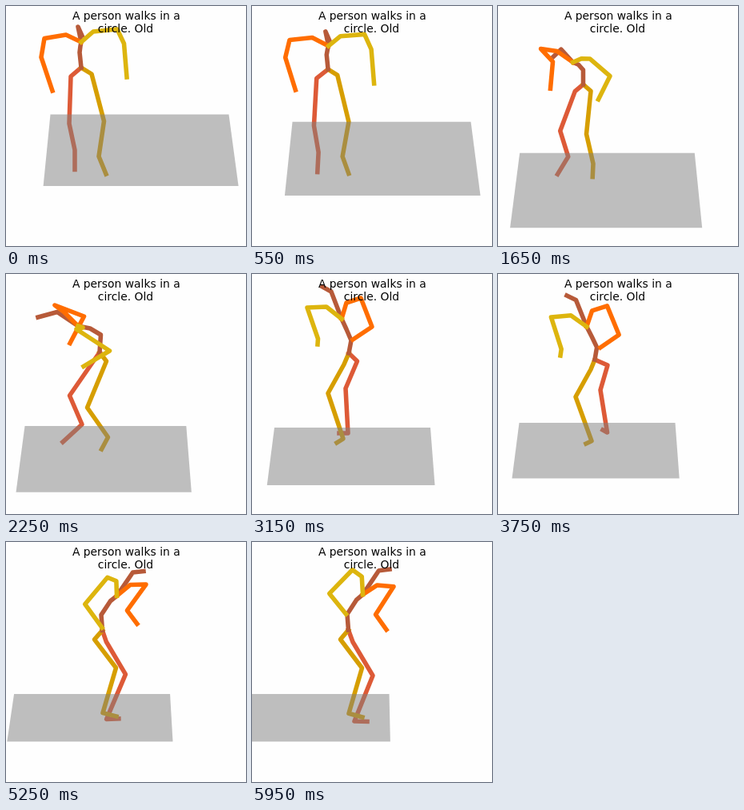
Animation, 300 px wide and 300 px high, one loop 6 s. Source, as an HTML page:

```html
<!DOCTYPE html>
<html lang="en">
<head>
<meta charset="utf-8">
<title>Walking figure</title>
<style>
  html, body { margin: 0; width: 100%; height: 100%; overflow: hidden; background: #fefefe; }
  svg { display: block; width: 100vw; height: 100vh; }
  polyline { fill: none; stroke-width: 5.56; stroke-linecap: square; stroke-linejoin: round; }
  text { font: 13.89px "DejaVu Sans", sans-serif; text-anchor: middle; }
</style>
</head>
<body>
<svg viewBox="0 0 300 300">
  <polyline id="rightLeg" stroke="#dd5a37"/>
  <polyline id="leftLeg" stroke="#d69e00"/>
  <polyline id="spine" stroke="#b75a39"/>
  <polyline id="rightArm" stroke="#ff6d00"/>
  <polyline id="leftArm" stroke="#ddb50e"/>
  <polygon id="floor" fill="#808080" fill-opacity=".5"/>
  <text x="150.3" y="17.3">A person walks in a</text>
  <text x="149.5" y="33.2">circle. Old</text>
</svg>
<script>
const LOOP = 6000, STEP = 50, STILL = [0, 0];

// Four key poses as x, y pairs. The spine runs from pelvis to head; limbs leave out their root.
// While a pose lasts, the pelvis and the tip of each chain drift by the given amounts.
const poses = [
  {
    name: "front", from: 0, to: 1050,
    spine: [94, 77, 92, 58, 93, 50, 94, 45, 90, 26, 95, 37],
    rightArm: [75, 36, 48, 40.5, 44, 64, 58, 106],
    leftArm: [109, 32, 139, 29, 147.5, 47, 151, 89],
    rightLeg: [81, 88, 79, 147, 86, 180, 86, 204.5],
    leftLeg: [107, 85, 122.5, 144, 116, 188, 125, 210],
    drift: { pelvis: [2, 4], spine: [4, 13], rightArm: [-7, -2], leftArm: [3, 15], rightLeg: [-8, 6], leftLeg: [-8, -1] }
  },
  {
    name: "turning", from: 2250, to: 2250,
    spine: [117, 98, 118.5, 76, 105, 68, 90, 65, 64, 47.5, 40, 54],
    rightArm: [72, 47, 61, 39, 97.5, 53, 80, 86.5],
    leftArm: [96, 67, 88, 69, 129.5, 96, 97, 115.5],
    rightLeg: [112, 105, 79.5, 152, 95, 188, 71, 210],
    leftLeg: [125.5, 109, 101.5, 167, 127.5, 204, 119.5, 219],
    drift: {}
  },
  {
    name: "facing left", from: 3150, to: 3750,
    spine: [121, 99, 124, 83, 118, 69, 112, 56, 99, 22, 88, 16],
    rightArm: [118, 36, 136, 30, 150, 66, 126, 82],
    leftArm: [93, 41, 69, 42, 82.5, 81, 82, 88],
    rightLeg: [131.5, 109, 117, 143, 120, 199, 109, 199],
    leftLeg: [115, 113, 95, 149, 114, 206, 106, 211],
    drift: { pelvis: [0, 8], spine: [-2, 11], rightArm: [2, 10], leftArm: [-4, 14], rightLeg: [22, -4], leftLeg: [4, 1] }
  },
  {
    name: "facing right", from: 4600, to: 5950,
    spine: [120.5, 111, 119, 92, 130.5, 75, 138.5, 69, 158.5, 40, 172, 39],
    rightArm: [154.5, 53, 173, 50.5, 148.5, 81, 160, 95.5],
    leftArm: [138.5, 54, 128, 53, 100.5, 90, 122.5, 123],
    rightLeg: [124.5, 124, 148, 164, 123.5, 219, 138, 217.5],
    leftLeg: [110.5, 122, 137.5, 157, 121, 213, 138, 217],
    drift: { pelvis: [0, -1], spine: [0, -5], rightArm: [8, 14], leftArm: [-5, -33], rightLeg: [6, 7], leftLeg: [0, 2] }
  }
];

const mix = (a, b, u) => a + (b - a) * u;
const ramp = (t, a, b) => Math.min(1, Math.max(0, (t - a) / Math.max(1, b - a)));
const ease = (t, a, b) => { const u = ramp(t, a, b); return u * u * (3 - 2 * u); };

// A start value plus eased moves, each [amount, begin, end].
const track = (t, start, ...moves) =>
  moves.reduce((sum, [amount, a, b]) => sum + amount * ease(t, a, b), start);

// Shift a chain of points, blending from the root's shift to the tip's.
function slide(points, root, tip, u) {
  const last = points.length / 2 - 1;
  return points.map((v, i) => v + u * mix(root[i % 2], tip[i % 2], Math.floor(i / 2) / last));
}

function shape(pose, u) {
  const { pelvis = STILL, spine: head = STILL } = pose.drift;
  const chestShift = pelvis.map((p, i) => mix(p, head[i], 3 / 5));
  const limb = (name, root, shift) =>
    slide([...root, ...pose[name]], shift, pose.drift[name] || STILL, u);
  const hip = pose.spine.slice(0, 2), chest = pose.spine.slice(6, 8);
  return {
    spine: slide(pose.spine, pelvis, head, u),
    rightArm: limb("rightArm", chest, chestShift),
    leftArm: limb("leftArm", chest, chestShift),
    rightLeg: limb("rightLeg", hip, pelvis),
    leftLeg: limb("leftLeg", hip, pelvis)
  };
}

const setPoints = (id, points) =>
  document.getElementById(id).setAttribute("points", points.map(v => v.toFixed(2)).join(" "));

function drawBody(t) {
  const i = poses.findLastIndex(p => p.from <= t);
  const pose = poses[i], next = poses[i + 1] || pose;
  const now = shape(pose, ramp(t, pose.from, pose.to)), then = shape(next, 0);
  const u = next === pose ? 0 : ease(t, pose.to, next.from);
  // The figure crouches while it turns; the feet stay put.
  const dip = track(t, 0, [12, 1050, 1650], [-12, 1650, 2250]);

  for (const name in now) {
    setPoints(name, now[name].map((a, k) => {
      const v = mix(a, then[name][k], u);
      return k % 2 ? v + dip * (210 - v) / 170 : v;
    }));
  }
}

// The floor is a rectangle in perspective, widening towards the viewer around x = 150.
function drawFloor(t) {
  const centre = track(t, 17, [-46, 0, 2700], [4.5, 2700, 3150], [-1.5, 3150, 3750],
    [3, 3750, 4600], [-59.5, 4600, 6300]);
  const half = track(t, 111.5, [-14, 1300, 2700]);
  const back = track(t, 135.6, [54.5, 0, 2100], [2, 2250, 3150], [-6, 3150, 3750], [4, 3750, 4600]);
  const depth = track(t, 89.5, [5, 0, 1050], [-22.5, 1450, 3000], [-12.5, 3400, 4600]);
  const x = (side, scale) => 150 + (centre + side * half) * scale;
  const near = 1 + depth * 0.00105, front = back + depth;
  setPoints("floor", [x(-1, 1), back, x(1, 1), back, x(1, near), front, x(-1, near), front]);
}

const start = performance.now();
function tick() {
  const t = Math.floor((performance.now() - start) % LOOP / STEP) * STEP;
  drawBody(t);
  drawFloor(t);
  requestAnimationFrame(tick);
}
tick();
</script>
</body>
</html>
```
